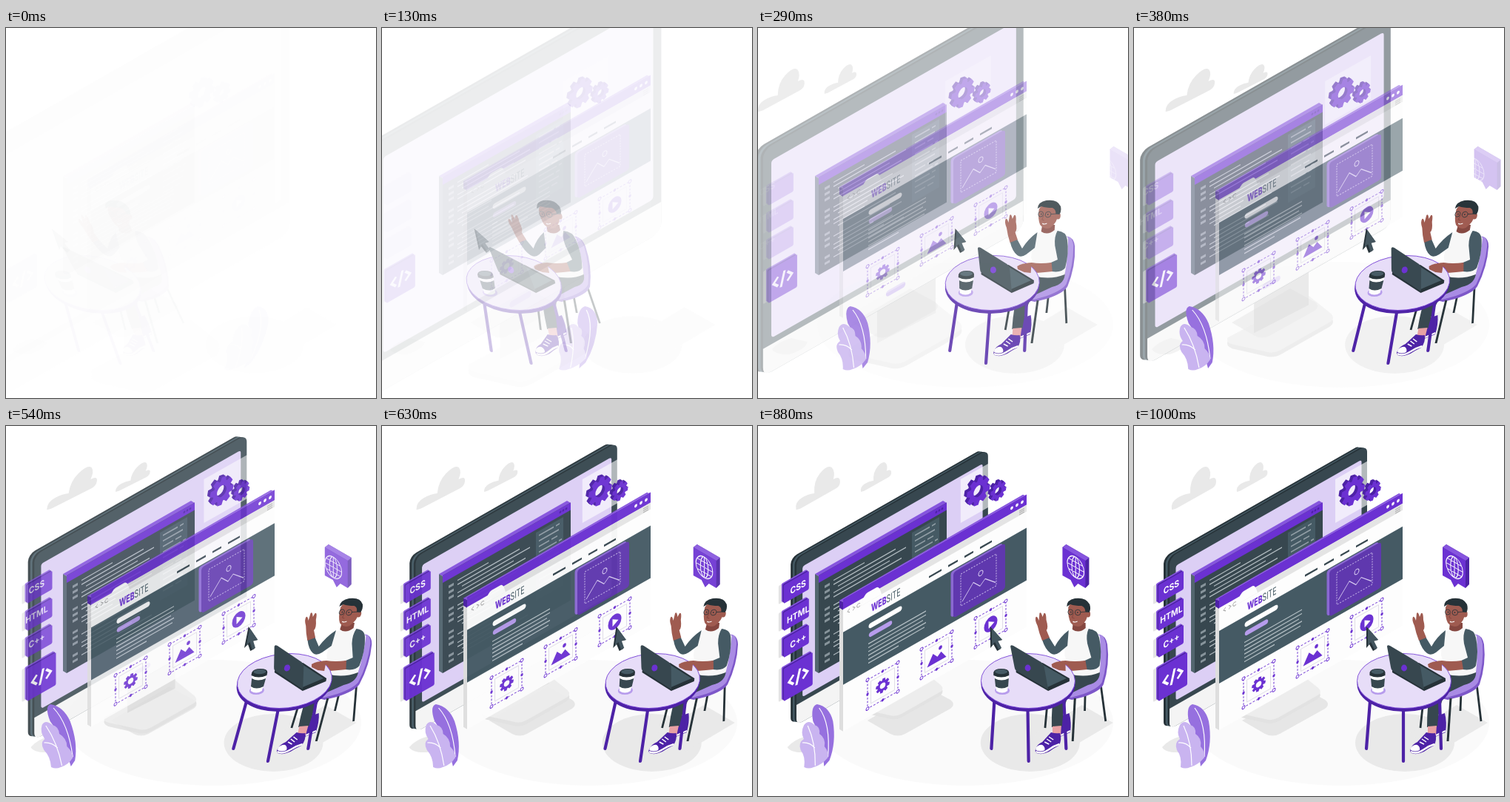
Animation, 500 px wide and 500 px high, one loop 1040 ms. Source, as an HTML page:

```html
<!DOCTYPE html>
<html lang="en">
<head>
<meta charset="utf-8">
<title>Website workspace</title>
<style>
html, body { margin: 0; width: 100%; height: 100%; overflow: hidden; background: #fff; }
svg { display: block; width: 100%; height: 100%; }
text { font-family: Inter, Roboto, sans-serif; }
</style>
</head>
<body>
<svg id="stage" viewBox="0 0 500 500"></svg>
<script>
const C = {
  main: '#6b31d2', light: '#8655de', deep: '#4d22a6', pale: '#b79cec', mist: '#dccff5',
  dark: '#37474f', ink: '#263238', slate: '#455a64', skin: '#9f5b50', skin2: '#854740'
};

// ---- drawing helpers ----
const rect = (x, y, w, h, fill, more = '') => `<rect x="${x}" y="${y}" width="${w}" height="${h}" fill="${fill}" ${more}/>`;
const path = (d, fill, more = '') => `<path d="${d}" fill="${fill}" ${more}/>`;
const line = (d, color, w, more = '') => `<path d="${d}" fill="none" stroke="${color}" stroke-width="${w}" ${more}/>`;
const oval = (x, y, rx, ry, fill, more = '') => `<ellipse cx="${x}" cy="${y}" rx="${rx}" ry="${ry}" fill="${fill}" ${more}/>`;
const at = (x, y, s) => `<g transform="translate(${x} ${y})">${s}</g>`;
const group = (id, s) => `<g id="${id}">${s}</g>`;
const round = 'stroke-linecap="round" stroke-linejoin="round"';
// isometric wall: x stays, y rises to the right
const wall = (x, s) => `<g transform="matrix(1 -.57 0 1 ${x} 0)">${s}</g>`;
const times = (n, f) => Array.from({ length: n }, (_, i) => f(i)).join('');

function gearPath(R, teeth = 8) {
  let d = '';
  for (let i = 0; i < teeth; i++) {
    [[-.42, .74], [-.24, 1], [.24, 1], [.42, .74]].forEach(([o, k]) => {
      const a = (i + o) * 2 * Math.PI / teeth + .2;
      d += `${d ? 'L' : 'M'}${(Math.cos(a) * R * k).toFixed(2)} ${(Math.sin(a) * R * k).toFixed(2)}`;
    });
  }
  const h = R * .4;
  return `${d}ZM${h} 0A${h} ${h} 0 1 0 ${-h} 0A${h} ${h} 0 1 0 ${h} 0Z`;
}

function gear(x, y, R) {
  const one = (dx, dy, fill) => `<g transform="matrix(.87 -.5 0 1 ${x + dx} ${y + dy})">${path(gearPath(R), fill, 'fill-rule="evenodd"')}</g>`;
  return times(4, i => one(-2 + i * .8, -1.2 + i * .5, C.deep)) + one(1.5, 1, C.main);
}

function codeMark(x, y, s) {
  return at(x, y, line(`M${-5 * s} ${-5 * s}l${-5 * s} ${5 * s}l${5 * s} ${5 * s}M${5 * s} ${-5 * s}l${5 * s} ${5 * s}l${-5 * s} ${5 * s}M${2 * s} ${-8 * s}L${-2 * s} ${8 * s}`, '#fff', 3.2));
}

// ---- parts ----
function shadows() {
  return oval(366, 428, 67, 39, '#e9e9e9') +
    path('M436 377L478 401L412 440L372 416Z', '#e9e9e9') +
    path('M38 434Q46 424 64 419L86 424Q84 434 62 441Q42 442 38 434Z', '#e9e9e9') +
    path('M146 398L225 352L258 370Q266 376 258 382L197 416Q187 421 177 416Z', '#e6e6e6');
}

function cloud(x, y, s) {
  return `<g transform="translate(${x} ${y}) scale(${s})">${path('M0 0Q-2 -10 8 -16Q16 -21 25 -22Q24 -38 33 -49Q43 -61 49 -57Q54 -52 51 -41Q60 -46 60 -38Q60 -32 55 -29L7 -2Q2 0 0 0Z', '#e9e9e9')}</g>`;
}

function monitor() {
  const shell = (dx, dy, fill) => at(dx, dy, wall(48, rect(0, 178, 267, 232, fill, 'rx="9"')));
  const stand = path('M136 385L224 338L249 358Q255 364 248 369L195 399Q186 404 177 401L141 393Q134 390 136 385Z', '#e2e2e2') +
    path('M136 381L224 334L249 354Q255 360 248 364L195 394Q186 399 177 396L141 388Q134 386 136 381Z', '#ededed') +
    path('M165 330L225 296L225 345L165 376Z', '#dcdcdc');
  return stand + shell(-8, -1, C.ink) + shell(-5, -.7, C.slate) + shell(-2.5, -.4, C.ink) + shell(0, 0, C.dark) +
    wall(48,
      path('M0 382H267V401Q267 410 258 410H9Q0 410 0 401Z', '#f4f4f4') +
      rect(8.5, 193.5, 251, 182, C.mist, 'rx="3"') +
      line('M129 398H143', C.pale, 6, round));
}

function codeWindow() {
  const ends = [62, 104, 118, 96, 112, 74, 100, 88, 115, 66];
  return path('M77 200L250 101L255 104L82 203Z', C.light) +
    path('M77 200L82 203V334L77 331Z', '#53666f') +
    wall(82,
      rect(0, 202, 173, 132, C.dark) + rect(0, 202, 173, 10, C.main) +
      rect(126, 216, 37, 92, C.slate) +
      times(3, i => oval(159 + i * 4, 207, 1.4, 1.5, C.deep)) +
      times(14, i => i % 4 === 3 ? '' : line(`M8 ${222 + i * 7.8}h7`, '#87949b', 3.4)) +
      times(19, i => i % 7 === 5 ? '' : line(`M${20 + (i % 3 === 2 ? 6 : 0)} ${220 + i * 5.6}H${ends[i % 10]}`, '#b3bdc2', 1.4)) +
      times(11, i => line(`M130 ${222 + i * 7.5}h${[20, 27, 14, 24][i % 4]}m3 0h${[5, 0, 8, 4][i % 4]}`, '#929fa6', 1.8)));
}

function card(y, h, w) {
  const face = (dx, dy, fill) => at(dx, dy, wall(33, rect(0, y, w, h, fill, 'rx="1.5"')));
  return face(-7, 1, '#e4e4e4') + face(-3, -2, C.light) + face(-1.5, -1, C.deep) + face(0, 0, C.main);
}

function label(y, s) {
  return wall(33, `<g transform="translate(17.5 ${y}) scale(.87 1)"><text font-size="12" font-weight="700" fill="#fff" text-anchor="middle">${s}</text></g>`);
}

function cards() {
  const langs = [[215, 'CSS'], [252, 'HTML'], [288, 'C++']];
  return group('langs',
    langs.map(([y]) => card(y, 25, 34)).join('') +
    group('labels', langs.map(([y, s]) => label(y + 16.7, s)).join(''))) +
    card(328, 44, 39) + wall(33, codeMark(19.5, 350, 1.25));
}

function selectBox(x, icon) {
  const w = 41, h = 39, y = 360;
  const ends = [[0, 0], [w, 0], [0, h], [w, h]], mids = [[w / 2, 0], [w / 2, h], [0, h / 2], [w, h / 2]];
  return at(x, y,
    rect(4.5, 4.5, w - 9, h - 9, 'none', 'stroke="#d9d5e2" stroke-width=".7"') +
    rect(0, 0, w, h, 'none', `stroke="${C.main}" stroke-width="1" stroke-dasharray="2.6 2"`) +
    ends.map(([a, b]) => oval(a, b, 2, 2, '#fff', `stroke="${C.main}"`)).join('') +
    mids.map(([a, b]) => oval(a, b, 1.7, 1.9, C.main)).join('') +
    at(w / 2, h / 2, icon));
}

function browser() {
  const menu = [[116, 133], [142, 155], [164, 176], [185, 201]];
  return path('M110 234L358 91L363 93L115 237Z', C.light) +
    path('M110 234L115 236V411L110 408Z', '#dedede') +
    path('M110 234L115 236V247L110 244Z', C.deep) +
    wall(115,
      rect(0, 232, 248, 179, '#fdfdfd') +
      rect(0, 232, 248, 14, C.main) +
      path('M24 255Q27 246 32 246H248V255Z', '#e4e4e4') +
      path('M24 255Q28 242 33 242H45Q49 242 52 255Z', '#fdfdfd') +
      times(3, i => oval(228 + i * 7, 239, 1.9, 2.1, '#fff')) +
      times(3, i => line(`M238 ${249 + i * 2.4}h7`, '#a9a9a9', 1)) +
      line('M9 250l-3 2.5l3 2.5M13 250l3 2.5l-3 2.5M23 251a2.4 2.4 0 1 0 0 3', '#a5a5a5', .9) +
      `<g transform="translate(38 271) scale(.63 1)"><text font-size="14" fill="${C.slate}"><tspan font-weight="800" fill="${C.main}">WEB</tspan>SITE</text></g>` +
      menu.map(([a, b]) => line(`M${a} 268.5H${b}`, C.dark, 2.6)).join('') +
      rect(0, 277, 248, 71, C.slate) +
      line('M38 289H76', '#fff', 7, round) + line('M38 301H63', C.pale, 6.5, round) +
      times(6, i => line(`M34 ${312 + i * 5.2}H${[112, 112, 108, 112, 110, 75][i]}`, '#b5c0c5', 1.4)) +
      at(-3.5, -2.5, rect(149, 281, 70, 62, '#8a68d2', 'rx="4"')) +
      rect(149, 281, 70, 62, '#5f38ae', 'rx="4"') +
      rect(159, 289, 48, 43, 'none', 'stroke="#cfc0ee" stroke-width=".9" stroke-dasharray="2 1.5"') +
      line('M161 327L176 310L185 320L192 314L206 327', '#d9cdf2', 1) +
      oval(186, 303, 3, 3.4, 'none', 'stroke="#d9cdf2"') +
      selectBox(33, path(gearPath(9.5), C.main, 'fill-rule="evenodd"')) +
      selectBox(106, path('M-13 10L-5 -4L1 3L6 -1L13 10Z', C.main) + oval(5, -7, 2.4, 2.6, C.main)) +
      selectBox(179, oval(0, 0, 9, 10, C.main) + path('M-3 -5L5 0L-3 5Z', '#fff')));
}

function gears() {
  return path('M272 72L334 37V96L272 131Z', '#fff', 'opacity=".62"') + gear(294.5, 87, 18.5) + gear(321.5, 87, 12.5);
}

function plant() {
  return path('M97 452Q106 428 101 399Q96 379 79 376Q70 379 74 399Q80 410 84 425Q88 440 90 460Z', '#9670df') +
    line('M82 381Q98 402 95 447', '#fff', 1.2) +
    path('M63 461Q65 447 58 438Q54 428 62 423Q57 414 62 404Q68 396 76 404Q84 406 83 416Q92 422 90 433Q96 440 95 448Q87 458 76 461Q69 464 63 461Z', '#c9b4f0') +
    line('M67 405Q78 428 78 459M60 428Q70 427 77 435', '#fff', 1.2);
}

function bubble() {
  return path('M417 164L422 160L453 178V214L448 219Z', C.deep) +
    path('M417 164L422 160L453 178L448 182Z', C.light) +
    path('M417 164L448 182V219L438 213L433 218L428 208L417 202Z', C.main) +
    group('globe', `<g transform="matrix(.87 .5 0 1 433 191)">${line('M13 0A13 14 0 1 0 -13 0A13 14 0 1 0 13 0M6 0A6 14 0 1 0 -6 0A6 14 0 1 0 6 0M-13 0H13M0 -14V14M-11 -7H11M-11 7H11', '#fff', 1.2)}</g>`);
}

function cursor() {
  return path('M314 271L330 289L323 291L328 301L323 304L318 295L314 300Z', C.ink) +
    path('M316 273L330 289L324 290L329 300L325 302L320 292L316 297Z', '#43555e');
}

function shoe(x, y) {
  return at(x, y,
    path('M0 17Q2 11 9 8L21 -5Q27 -3 33 -4Q36 6 31 13Q25 16 18 21Q8 26 1 23Q-2 21 0 17Z', C.deep) +
    path('M0 16Q4 11 9 12Q13 15 12 19Q6 22 0 19Z', '#fff') +
    line('M0 21Q8 25 18 18Q25 13 32 11', '#fff', 2.4) +
    line('M12 8L18 11M15 4L21 8M18 1L24 5', '#fff', 1.5));
}

function person() {
  const chair = line('M393 352L387 408M442 360L441 385M463 348L469 399', C.ink, 2.8) +
    path('M459 283Q470 280 473 295Q476 322 467 349Q463 358 440 366L424 370Q412 368 409 362L450 340Z', '#7d57c9') +
    path('M459 282Q468 279 471 294Q473 322 465 346Q461 354 440 362L423 367Q412 365 409 359L450 338Z', '#a98be4') +
    line('M428 368L424 426', C.ink, 3);
  const legs = path('M409 392L420 388Q423 400 421 414L407 420Q405 410 409 392Z', C.deep) + line('M408 418L421 412', '#fff', 2) +
    path('M424 334Q446 340 462 330Q464 346 446 350L421 362Q412 376 410 406L396 407Q396 375 401 352Q408 342 424 334Z', C.dark) +
    path('M397 406L409 405L408 418L397 415Z', '#e8a1a4') + shoe(374, 419);
  const body = path('M416 281Q426 274 440 272Q455 274 463 284Q465 310 462 333Q443 341 421 335Q420 322 415 310Z', '#f7f7f7') +
    path('M421 276Q409 285 402 298L394 285L385 289Q389 302 396 307Q401 311 408 306L419 297Z', C.slate) +
    path('M385 290Q381 280 379 270Q375 262 377 258Q379 257 381 263L382 253Q384 250 386 258L388 253Q391 251 391 262Q394 273 391 276L395 286Z', C.skin) +
    path('M448 274Q460 275 462 286Q466 304 462 324Q458 331 444 329L440 318L451 313L446 294Q444 282 448 274Z', C.slate) +
    path('M443 317Q428 319 416 317Q407 317 397 323Q397 327 402 327L408 331Q416 332 445 329Z', C.skin);
  const head = path('M427 266H444V273Q435 281 426 275Z', C.skin2) +
    path('M421 245Q424 237 434 238Q447 238 448 250Q447 263 438 270Q430 273 424 266Q420 258 421 245Z', C.skin) +
    oval(447.5, 254, 3.2, 4.6, C.skin) +
    path('M419 244Q419 235 430 233Q445 231 450 241Q452 248 449 252L444 251Q444 245 439 243Q430 243 424 241Z', C.ink) +
    line('M420.5 251.5a3.4 3.6 0 1 0 6.8 0a3.4 3.6 0 1 0 -6.8 0M430 252a3.8 3.8 0 1 0 7.6 0a3.8 3.8 0 1 0 -7.6 0M437.6 251.5L447 251', C.ink, .8) +
    oval(424.5, 251.5, .8, .9, C.ink) + oval(433.5, 252, .8, .9, C.ink) +
    line('M428 253L426 259L429 260', C.skin2, 1) + line('M427 264Q429 266 433 264', '#fff', 1.1);
  const leg = d => line(d, C.deep, 4.2, round);
  const table = leg('M319 372L314 436M413 370L415 436M364 382V453') +
    path('M301.5 345V349A63.5 37 0 0 0 428.5 349V345Z', C.deep) +
    oval(365, 344.5, 63.5, 37, '#e7ddf8', `stroke="${C.main}" stroke-width=".8"`);
  const cup = oval(330, 357.5, 10, 5.5, C.pale) +
    path('M319.5 335L322 358Q330 363 337 358L339.5 335Z', '#fff') +
    path('M320 341Q329 346 339 341L338 352Q329 357 321 352Z', C.dark) +
    path('M318.5 333Q320 328 329 328Q339 328 339.5 333V337Q329 342 318.5 337Z', C.ink) +
    oval(329, 332, 8.5, 3.2, C.slate);
  const laptop = path('M349 329L385 320L421 341V345L392 358L349 333Z', C.ink) +
    path('M362 330L386 323L417 341L391 353Z', C.slate) +
    path('M342 298Q342 295 346 297L383 319Q386 321 387 325L392 356L350 331Q347 329 347 326Z', C.dark) +
    oval(365, 327, 4, 4.4, C.main);
  // the hand rests over the keyboard
  const hand = path('M397 322Q405 317 416 318L416 331L407 330L398 326Z', C.skin);
  return chair + legs + body + head + table + cup + laptop + hand;
}

document.getElementById('stage').innerHTML =
  group('floor', oval(280, 401, 200, 85, '#fafafa')) +
  group('shadows', shadows()) +
  group('clouds', cloud(51, 113, 1) + cloud(139, 89, .69)) +
  group('monitor', monitor()) +
  group('code', codeWindow()) +
  group('cards', cards()) +
  group('gears', gears()) +
  group('browser', browser()) +
  group('plant', plant()) +
  group('bubble', bubble()) +
  group('cursor', cursor()) +
  group('person', person());

// ---- motion ----
function ease(x) {
  if (x <= 0 || x >= 1) return x <= 0 ? 0 : 1;
  const curve = (a, b, s) => 3 * a * s * (1 - s) ** 2 + 3 * b * s * s * (1 - s) + s ** 3;
  let lo = 0, hi = 1;
  for (let i = 0; i < 30; i++) {
    const s = (lo + hi) / 2;
    if (curve(.36, .5, s) < x) lo = s; else hi = s;
  }
  return curve(-.01, 1.38, lo);
}

const slide = (dx, dy = 0, power = 1) => t => {
  const e = ease(t);
  return [`translate(${dx * (1 - e)} ${dy * (1 - e)})`, Math.max(0, e) ** power];
};
const fade = slide(0);
const zoom = (cx, cy) => t => {
  const s = 1.5 - .5 * ease(t);
  return [`translate(${cx} ${cy}) scale(${s}) translate(${-cx} ${-cy})`, ease(t)];
};
// rush in from one side, leaning, then wobble upright
const rush = (dir, cy) => t => {
  const stops = [[0, .364], [.6, -.176], [.8, .035], [1, 0]];
  const i = t < .6 ? 0 : t < .8 ? 1 : 2;
  const [t0, k0] = stops[i], [t1, k1] = stops[i + 1];
  const e = ease((t - t0) / (t1 - t0));
  const k = dir * (k0 + (k1 - k0) * e);
  const dx = i ? 0 : -250 * dir * (1 - e);
  return [`matrix(1 0 ${k} 1 ${dx - k * cy} 0)`, i ? 1 : e];
};

const moves = {
  floor: fade, code: fade, langs: fade,
  browser: slide(0, -30),
  shadows: slide(-30), gears: slide(-30), cards: slide(-30), labels: slide(-30), globe: slide(-30),
  bubble: slide(92, 0, 2),
  monitor: zoom(177.5, 219),
  clouds: rush(1, 82), cursor: rush(1, 288), person: rush(1, 350), plant: rush(-1, 419)
};
const parts = Object.entries(moves).map(([id, move]) => [document.getElementById(id), move]);

const LOOP = 1040, STEP = 1000 / 24;
const start = performance.now();
let shown = -1;
function draw() {
  const step = Math.min(24, Math.floor(((performance.now() - start) % LOOP + 5) / STEP));
  if (step !== shown) {
    shown = step;
    const t = (step + 1) / 25;
    for (const [el, move] of parts) {
      const [transform, opacity] = move(t);
      el.setAttribute('transform', transform);
      el.setAttribute('opacity', Math.max(0, Math.min(1, opacity)));
    }
  }
  requestAnimationFrame(draw);
}
draw();
</script>
</body>
</html>
```
